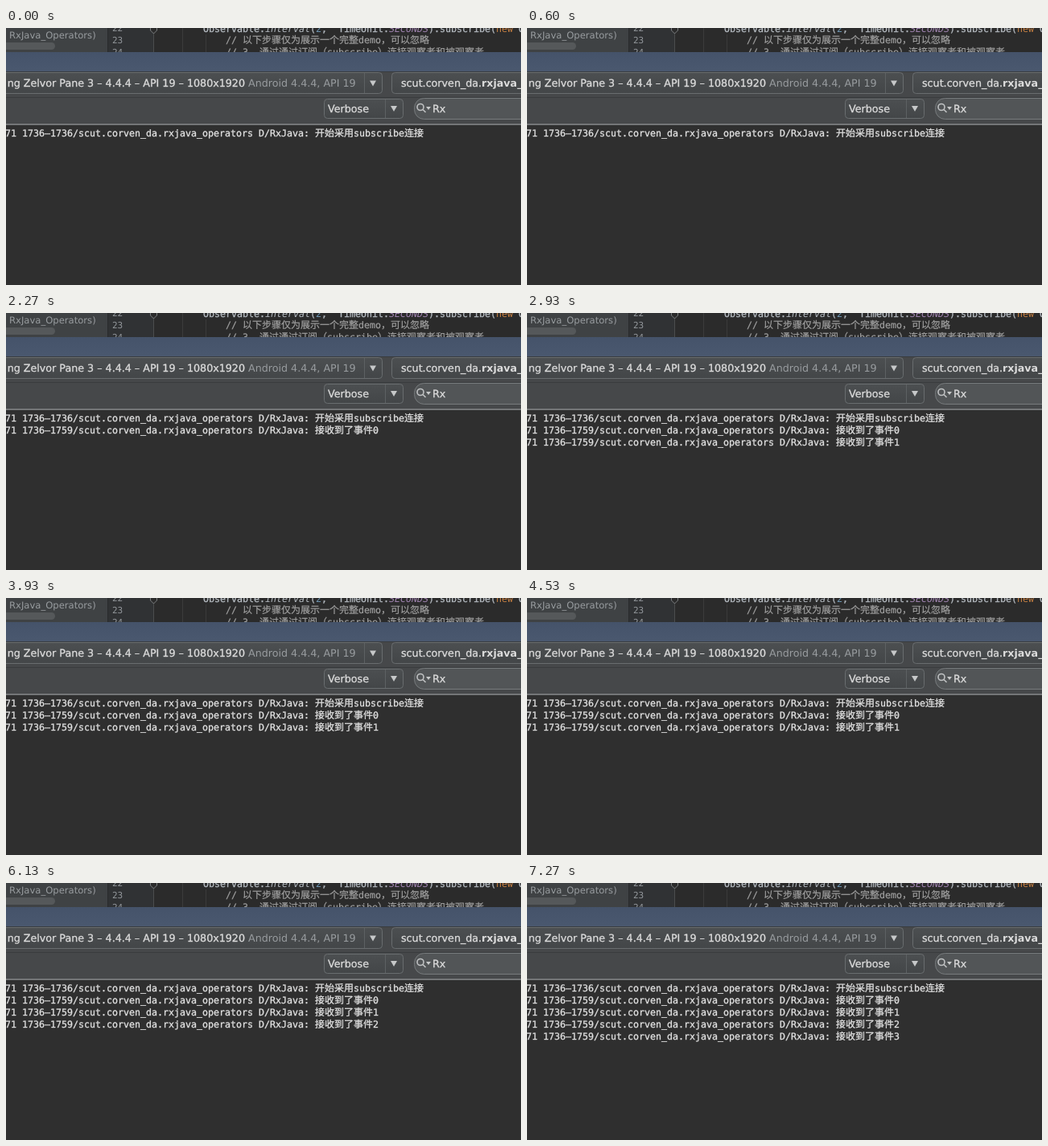
An HTML page for the animation above (7340 ms loop, 640 px wide and 320 px high).

```html
<!DOCTYPE html>
<html lang="zh-CN">
<head>
<meta charset="utf-8">
<title>RxJava interval log</title>
<style>
  html, body { margin: 0; width: 100%; height: 100%; overflow: hidden; background: #2f2f2f; }
  svg { display: block; width: 100%; height: 100%; }
  text { white-space: pre; text-rendering: geometricPrecision; stroke-width: .3px; }
  .ui { font: 12.7px "DejaVu Sans", sans-serif; fill: #dcdcdc; stroke: #dcdcdc; }
  .muted { fill: #989c9f; stroke: none; }
  .mono { font: 11.63px "DejaVu Sans Mono", monospace; }
  .cjk { font: 12px "Noto Sans CJK SC", "Noto Sans CJK", sans-serif; }
  .code { fill: #b4bac0; stroke: #b4bac0; }
  .code tspan { stroke: none; }
  .comment { fill: #a0a0a0; stroke: #a0a0a0; stroke-width: .2px; }
  .number { fill: #92969a; font-size: 11px; }
  .log { fill: #e2e2e2; stroke: #e2e2e2; }
  .field { fill: url(#fieldFill); stroke: #696d6f; }
  .divider { stroke: #5d6163; }
  .arrow { fill: #c6c8c9; }
</style>
</head>
<body>
<svg viewBox="0 0 640 320" preserveAspectRatio="none">
  <defs>
    <linearGradient id="titleFill" x2="0" y2="1">
      <stop offset="0" stop-color="#45536a"/>
      <stop offset="1" stop-color="#4a586f"/>
    </linearGradient>
    <linearGradient id="fieldFill" x2="0" y2="1">
      <stop offset="0" stop-color="#4c4f51"/>
      <stop offset="1" stop-color="#434648"/>
    </linearGradient>
  </defs>

  <!-- Editor behind the log window -->
  <rect width="640" height="31" fill="#2b2b2b"/>
  <rect width="126" height="31" fill="#3f4244"/>
  <rect x="-6" y="18" width="67" height="9" rx="4.5" fill="#55585a"/>
  <rect x="126" width="57" height="31" fill="#303234"/>
  <path d="M126.5 0V31" stroke="#292b2c"/>
  <path d="M183.5 0V31" stroke="#4b4d4e"/>
  <path d="M219.500 0V31M248.500 8V31" stroke="#3b3b3b"/>
  <path d="M179.500 -2H187.500V3L183.500 7L179.500 3Z" fill="#2b2b2b" stroke="#7b7e80"/>
  <text class="ui muted" x="4" y="13" style="font-size:11.6px">RxJava_Operators)</text>
  <g class="mono number">
    <text x="132" y="4">22</text>
    <text x="132" y="19">23</text>
    <text x="132" y="34">24</text>
  </g>
  <text class="mono code" x="245" y="4.500">Observable.<tspan font-style="italic">interval</tspan>(<tspan fill="#6f97b3">2</tspan>,  TimeUnit.<tspan fill="#a084b0" font-style="italic">SECONDS</tspan>).subscribe(<tspan fill="#c98142">new</tspan> Observer</text>
  <g id="comments"></g>

  <!-- Log window -->
  <rect y="30" width="640" height="91" fill="#46484a"/>
  <rect y="30" width="640" height="24" fill="url(#titleFill)"/>
  <path d="M0 54.500H640M0 86.500H640" stroke="#393c3e"/>
  <rect y="121" width="640" height="199" fill="#2f2f2f"/>
  <rect y="119" width="640" height="2" fill="#747678"/>

  <rect class="field" x="-10" y="55.500" width="477.500" height="26" rx="4"/>
  <path class="divider" d="M445.500 56V81"/>
  <path class="arrow" d="M452 65.500H460L456 72.500Z"/>
  <text class="ui" x="297" y="73" text-anchor="end">ng Zelvor Pane 3 – 4.4.4 – API 19 – 1080x1920</text>
  <text class="ui muted" x="301" y="73">Android 4.4.4, API 19</text>

  <rect class="field" x="479.500" y="55.500" width="180" height="26" rx="4"/>
  <text class="ui" x="491" y="73">scut.corven_da.</text>
  <text class="ui" x="591" y="73" style="font-weight:bold;stroke:none">rxjava_operators</text>

  <rect class="field" x="395.500" y="88.500" width="98" height="24" rx="4"/>
  <path class="divider" d="M471.500 89V112"/>
  <path class="arrow" d="M478 97H486L482 104Z"/>
  <text class="ui" x="400" y="105">Verbose</text>

  <rect x="507.500" y="87.500" width="160" height="26" rx="12" fill="#525557" stroke="#777b7d"/>
  <g fill="none" stroke="#c0c2c3" stroke-width="1.6">
    <circle cx="515" cy="98.500" r="4"/>
    <path d="M518 101.500L521.500 105"/>
  </g>
  <path class="arrow" d="M522 98H528L525 102Z"/>
  <text class="ui" x="530" y="105">Rx</text>

  <g id="log"></g>
</svg>
<script>
  const LOOP = 7340;
  const FIRST_EVENT = 630;
  const EVENT_GAP = 2000;
  const LINE_HEIGHT = 15;
  const SVG_NS = "http://www.w3.org/2000/svg";

  // Chinese runs use their own font and size beside the monospaced text.
  function addText(parentId, className, x, y, content) {
    const text = document.createElementNS(SVG_NS, "text");
    text.setAttribute("class", "mono " + className);
    text.setAttribute("x", x);
    text.setAttribute("y", y);
    text.innerHTML = content.replace(/[\u3000-\u9fff\uff00-\uffef]+/g,
      run => `<tspan class="cjk">${run}</tspan>`);
    document.getElementById(parentId).append(text);
    return text;
  }

  function addLog(row, thread, message) {
    const prefix = `71 1736–${thread}/scut.corven_da.rxjava_operators D/RxJava: `;
    return addText("log", "log", -1, 135 + row * LINE_HEIGHT, prefix + message);
  }

  addText("comments", "comment", 273, 19, "// 以下步骤仅为展示一个完整demo，可以忽略");
  addText("comments", "comment", 273, 34, "// 3. 通过通过订阅（subscribe）连接观察者和被观察者");
  // The window covers the lower part of the last editor row.
  document.getElementById("comments").setAttribute("clip-path", "polygon(0 0)");
  document.getElementById("comments").removeAttribute("clip-path");

  addLog(0, 1736, "开始采用subscribe连接");
  const events = [0, 1, 2, 3].map(i => addLog(i + 1, 1759, "接收到了事件" + i));

  function draw() {
    const time = performance.now() % LOOP;
    events.forEach((line, i) => {
      const shown = time >= FIRST_EVENT + i * EVENT_GAP;
      line.setAttribute("visibility", shown ? "visible" : "hidden");
    });
    requestAnimationFrame(draw);
  }
  draw();
</script>
</body>
</html>
```
